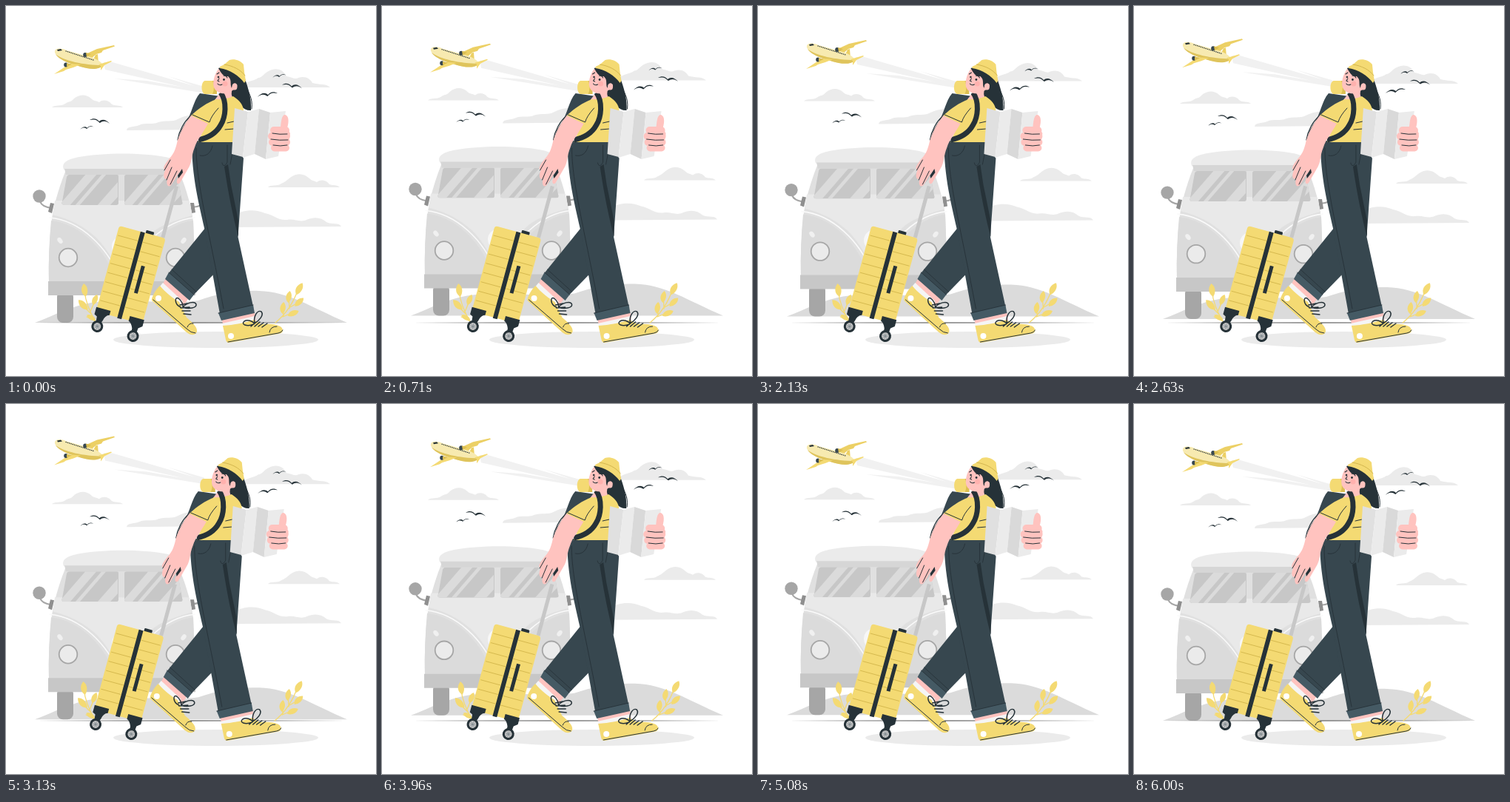
Animation of 500x500 px, one loop 6040 ms. Source, as an HTML page:

```html
<!DOCTYPE html>
<html lang="en">
<head>
<meta charset="utf-8">
<title>Traveller</title>
<style>
html, body { margin: 0; width: 100%; height: 100%; overflow: hidden; background: #fff; }
svg { display: block; width: 100vw; height: 100vh; }
.line { fill: none; stroke: #263238; stroke-linecap: round; stroke-linejoin: round; }
.skin { fill: #ffc3bf; }
.yellow { fill: #f4da73; }
.dark { fill: #263238; }
.slate { fill: #37474f; }
.cloud { fill: #ebebeb; }
</style>
</head>
<body>
<svg viewBox="0 0 500 500">
<defs>
  <path id="bird" class="dark" d="M-14-1C-9-4-4-3-1 1C3-3 9-1 13 4C8 0 4 0 0 3C-1 3-1 2-2 1.500C-5-2-8-2-14-1Z"/>
  <path id="leaf" class="yellow" d="M0 9C-6 4-5-4 1-9C6-4 5 4 0 9Z"/>
  <g id="wheel">
    <circle r="8" class="dark"/><circle r="4.9" fill="#c7c7c7"/>
    <path d="M-4 0H4M0-4V4M-3-3L3 3M3-3L-3 3" stroke="#7d878c" stroke-width=".7"/>
  </g>
  <clipPath id="panes">
    <path d="M86 228H150Q152 228 152 230V266Q152 269 149 269H79Q74 269 76 264L82 231Q83 228 86 228Z"/>
    <path d="M163 228H228Q231 228 232 231L238 264Q240 269 235 269H163Q160 269 160 266V231Q160 228 163 228Z"/>
  </clipPath>
</defs>

<g id="scenery">
  <g class="cloud">
    <path d="M62 137C67 133 74 136 80 132C86 128 87 131 92 125C99 119 109 119 115 125C119 129 123 128 126 130C130 126 139 127 142 132C147 136 153 133 158 137Z"/>
    <path d="M163 168C164 162 172 164 180 161C188 157 198 161 206 157C215 154 225 157 232 153C243 147 257 145 266 152V167Z"/>
    <path d="M318 110C323 101 334 102 341 97C346 97 348 91 355 88C364 83 374 85 379 95C386 96 391 100 395 97C404 94 411 98 414 104C423 107 432 104 438 110Z"/>
    <path d="M354 245C357 241 367 244 372 240C380 237 381 233 387 230C395 225 404 227 410 233C414 237 417 236 420 238C426 233 434 236 437 241C442 243 447 241 451 245Z"/>
    <path d="M306 299V284C319 275 337 274 350 280C362 282 367 290 380 289C390 287 397 293 406 289C417 284 427 286 433 292C441 296 450 292 453 298Z"/>
  </g>
  <path fill="#dbdbdb" d="M39 428C65 418 90 405 115 401C160 394 220 404 260 398C285 389 315 384 342 385C382 386 412 407 461 428Z"/>

  <path fill="none" stroke="#a6a6a6" stroke-width="2.2" d="M46 264C48 270 54 272 61 273M251 272Q258 272 264 269"/>
  <circle cx="45" cy="257" r="8.7" fill="#a6a6a6"/>
  <path fill="#8f8f8f" d="M60 266L65 267L62 280L57 278ZM249 266L254 266L256 279L251 280Z"/>
  <rect x="69" y="385" width="22" height="43" rx="8" fill="#a6a6a6"/>
  <path fill="#e0e0e0" d="M82 219H231C240 236 249 263 253 291L256 374H58C57 344 59 315 62 287C66 262 74 239 82 219Z"/>
  <path fill="#e9e9e9" d="M63 282C85 288 100 294 121 312C137 328 150 350 157 372C165 347 181 319 200 304C218 292 235 288 252 283L247 263H66Z"/>
  <path fill="#dbdbdb" d="M61 290C101 294 137 332 150 374H58Q57 330 61 290ZM253 290C216 294 180 332 166 374H256Z"/>
  <path class="line" style="stroke:#fafafa" stroke-width="1.6" d="M59 286C101 290 137 326 154 368M255 286C214 290 178 326 161 368"/>
  <path fill="#ebebeb" d="M78 221C74 211 84 207 99 204C132 198 184 198 215 204C230 207 238 212 235 222Z"/>
  <path fill="#d6d6d6" d="M79 220H235L233 228H81Z"/>
  <g clip-path="url(#panes)">
    <path fill="#c7c7c7" d="M70 225H245V272H70Z"/>
    <path fill="#dbdbdb" d="M109 226H124L85 271H70ZM131 226H137L98 271H92ZM151 238V258L139 271H122ZM194 226H208L169 271H155ZM215 226H221L182 271H176ZM240 232V252L222 271H205Z"/>
  </g>
  <circle cx="157" cy="325" r="14" fill="#f7f7f7"/>
  <g fill="#ebebeb" stroke="#a6a6a6" stroke-width="1.8">
    <circle cx="84" cy="340" r="12.3"/><circle cx="229" cy="340" r="12.3"/>
  </g>
  <g fill="#f0f0f0">
    <ellipse cx="73" cy="317" rx="3" ry="4.5" transform="rotate(-38 73 317)"/>
    <ellipse cx="240" cy="317" rx="3" ry="4.5" transform="rotate(38 240 317)"/>
  </g>
  <path fill="#c7c7c7" d="M57 372H256V391H57Z"/>

  <use href="#bird" x="127" y="155"/>
  <use href="#bird" transform="translate(109 164) scale(-.66 .66)"/>
  <use href="#bird" transform="translate(353 119) scale(-1 1)"/>
  <use href="#bird" x="387" y="107.500"/>
  <use href="#bird" transform="translate(369 94) scale(-.66 .66)"/>
</g>

<path fill="#7a7a7a" d="M40 428Q250 426.500 460 428Q250 429.500 40 428Z"/>
<ellipse cx="283.500" cy="451" rx="138.500" ry="11" fill="#ebebeb"/>

<g id="plants"></g>

<g id="plane">
  <path fill="#f1f1f1" d="M132 76L144 76L268 112V116L134 86ZM146 98L190 101L270 115V118ZM219 95L268 109V113Z"/>
  <path fill="#ecd065" d="M101 68L123 58L146 53L147 54.500L131 60L129 63L122 65L114 72ZM118 72L121 66L124 65L125 78Z"/>
  <path fill="#f7eab0" d="M66 63C65 57 73 56 82 60L118 70C125 73 130 77 131 80C129 84 119 86 109 84C92 80 70 72 66 63Z"/>
  <path fill="#dfc45c" d="M67 65C78 74 105 80 131 80C128 85 118 86 109 84C92 80 72 74 67 65Z"/>
  <path class="yellow" d="M86 78L74 86L65 92L78 88L81 86L91 83L101 79ZM125 79L142 74L143 75L133 80L128 87L128 81Z"/>
  <path class="dark" d="M69 59L74 58L76 60L70 61Z"/>
  <path class="line" stroke-width="1.3" stroke-dasharray=".4 2" d="M81 61L118 73"/>
  <ellipse cx="107" cy="66" rx="2.800" ry="3" class="slate"/><ellipse cx="81" cy="79.500" rx="2.800" ry="3" class="slate"/>
  <path fill="#dcbf52" d="M108 63L115 65L109 69ZM82 77L89 79L82 82Z"/>
</g>

<g id="walker">
  <g id="suitcase" transform="translate(153 297) rotate(15.200)">
    <path stroke="#c7c7c7" stroke-width="5" d="M61 0V-72"/>
    <rect x="37" y="-4" width="11" height="7" rx="1" class="dark"/>
    <rect width="65" height="120" rx="4" class="yellow"/>
    <path id="ribs" class="line" style="stroke:#d5b84e" stroke-width=".9"/>
    <path class="dark" d="M30 0H36V121H30ZM43 44H48V82H43Z"/>
    <path class="dark" d="M-1 114H19V120Q13 122 12 130L8 139L4 136L3 126L-1 124ZM46 114H66V123L61 127L60 137L54 139L53 129Q50 122 46 121Z"/>
    <use href="#wheel" x="7" y="139"/><use href="#wheel" x="57" y="139"/>
  </g>

  <path class="slate" d="M262 118L290 122L286 154L245 178L235 184C232 176 236 167 243 158C251 146 253 128 262 118Z"/>
  <path class="line" stroke-width="1.2" d="M249 149C241 156 234 168 232 181"/>
  <path class="yellow" d="M269 101H283V119H269C263 118 263 102 269 101Z"/>
  <path fill="#dcbf52" d="M279 101H285V119H279Q283 110 279 101Z"/>

  <path class="skin" d="M216 368L246 396L240 405L209 381Z"/>
  <path fill="#f5f5f5" d="M212 374L239 399L235 405L207 380Z"/>
  <path class="yellow" d="M208 378C215 387 226 395 234 400L244 421C252 428 259 434 258 440C256 446 249 445 244 441L197 398C196 395 202 383 208 378Z"/>
  <circle cx="206" cy="395" r="4" fill="#fff"/>
  <path class="line" stroke-width="1" d="M199 397L244 436Q250 442 256 442M245 434Q247 428 253 429"/>
  <path class="line" stroke-width="1.5" d="M235 404L245 402M236 408L248 407M238 412L249 412M240 416L250 417M236 407C227 403 228 392 233 395C237 398 240 404 239 407C244 401 255 398 257 403C258 408 247 410 239 407"/>
  <path class="slate" d="M270 299L219 362L251 393L286 357Z"/>
  <path fill="#455a64" d="M220 360L254 390L248 398L215 369Z"/>
  <path class="line" stroke-width=".8" d="M220 360L254 390M224 356L257 386"/>

  <path class="skin" d="M291 420L335 411L338 426L294 434Z"/>
  <path fill="#f5f5f5" d="M292 429L336 419L337 425L294 434Z"/>
  <path class="yellow" d="M293 432C308 431 324 428 335 424L345 430C355 429 368 430 372 434C376 439 374 442 368 443L301 455Q298 455 297 451Z"/>
  <circle cx="304" cy="446" r="4" fill="#fff"/>
  <path class="line" stroke-width="1" d="M300 454L368 442Q373 441 374 438M356 441Q357 433 366 433"/>
  <path class="line" stroke-width="1.500" d="M331 433L338 427M336 433L343 427M341 433L348 428M346 434L353 429M335 430C325 434 317 430 322 426C327 423 333 426 336 429C334 419 340 410 345 413C349 418 342 425 336 429"/>
  <path class="slate" d="M251 182H309L321 206L313.500 312L334 406L289 416L268 300C261 268 251 232 251 182Z"/>
  <path class="dark" d="M295 217L300 214L304 241L314 290V312C307 285 301 257 295 217Z"/>
  <path fill="#455a64" d="M287 415L334 404L336 415L291 425Z"/>
  <path class="line" stroke-width=".9" d="M287 415L334 404M257 192C257 239 274 302 294 409M299 188V211C297 216 293 218 292 212M279 189C277 199 270 204 262 202M303 214L308 188"/>

  <path class="skin" d="M292 114L308 114L314 129L294 132L282 127Z"/>
  <path class="dark" d="M303 89L322 96C327 110 332 124 331 141C321 142 315 132 307 125Q303 119 306 112Z"/>
  <path class="line" stroke-width="1" d="M322 104C327 117 334 123 332 139"/>
  <path class="yellow" d="M284 126C292 127 300 125 307 122C315 127 320 133 321 140L309 184H260L269 161L250 148C261 138 271 131 284 126Z"/>
  <path class="line" stroke-width="1" d="M252 147L275 157Q277 149 287 138M299 158L308 156M296 167L308 166"/>
  <path class="line" stroke-width="7" style="stroke-linecap:butt" d="M290 117C299 129 297 150 290 161C284 172 274 178 260 181"/>

  <path class="skin" d="M250 148L273 159C266 172 258 181 255 191C250 203 252 211 246 220L235 239C232 242 229 239 232 233L235 224L230 231L223 242C219 246 216 241 218 234C213 235 212 229 215 222C211 219 214 215 220 207C228 199 230 190 232 181Q238 163 250 148Z"/>
  <path class="line" stroke-width="1" d="M217 235L224 218M214 222L222 208M222 241L231 223"/>
  <path class="dark" d="M232 229L238 220L239 225L233 233Z"/>

  <g>
    <path fill="#e0e0e0" d="M309 138L327 143L320 204L305 200Z"/>
    <path fill="#ebebeb" d="M327 143L342 139L336 200L320 205Z"/>
    <path fill="#d9d9d9" d="M342 139L357 144L351 207L336 200Z"/>
    <path fill="#ebebeb" d="M357 144L378 142L368 203L351 207Z"/>
  </g>
  <path class="skin" d="M370 170C372 161 371 150 376 147C382 147 383 155 380 165L384 172L381 192L363 194Z"/>
  <g class="skin">
    <rect x="357" y="163" width="26" height="10" rx="5"/><rect x="354" y="171" width="30" height="10" rx="5"/>
    <rect x="355" y="179" width="29" height="10" rx="5"/><rect x="358" y="187" width="25" height="9.500" rx="4.700"/>
  </g>
  <path class="line" stroke-width="1" d="M360 172Q370 174 380 173M358 180Q370 182 381 181M361 188Q371 190 380 188"/>

  <path class="skin" d="M288 84C281 92 278 106 282 112C287 119 299 121 306 114C313 112 314 105 310 104L309 95Z"/>
  <path class="dark" d="M287 84C296 82 309 88 315 96L312 106C308 102 306 107 305 111C302 105 306 100 300 95C294 96 291 91 287 84Z"/>
  <ellipse cx="309" cy="109" rx="3.500" ry="4.500" class="skin"/>
  <circle cx="296" cy="105" r="3.500" fill="#ff9c98" opacity=".45"/>
  <circle cx="287" cy="96" r="1.300" class="dark"/><circle cx="294.500" cy="99.500" r="1.400" class="dark"/>
  <path class="line" stroke-width="1.100" d="M285 92L288 90M294 94Q298 94 299 97M288 98L286 101L288 102M286 105Q288 108 292 106"/>
  <path class="yellow" d="M289 82L295 79L302 73C309 71 317 74 321 79L322 89L324 101L322 104C315 94 302 86 289 84Z"/>
  <path class="line" style="stroke:#cfb24b" stroke-width=".9" d="M295 79C307 81 317 86 323 94"/>
</g>
</svg>

<script>
const LOOP = 6040, LONG = 6000, SHORT = 1500;
const SHAKE = [0, -1, 2, -4, 4, -4, 4, -4, 2, -1, 0];
const byId = id => document.getElementById(id);
const move = (id, x, y) => byId(id).setAttribute('transform', `translate(${x} ${y})`);

const leaf = (x, y, angle, size = 1) =>
  `<use href="#leaf" transform="translate(${x} ${y}) rotate(${angle}) scale(${size})"/>`;
const stem = d => `<path class="line" style="stroke:#f4da73" stroke-width="1.300" d="${d}"/>`;

byId('plants').innerHTML =
  stem('M122 428C112 412 107 396 106 384M116 417L100 401M114 413L122 394M121 426L109 420') +
  leaf(106, 384, -12) + leaf(104, 404, -48) + leaf(120, 397, 18, .85) + leaf(115, 421, -65, .75) +
  stem('M364 428C381 414 390 397 395 382M375 419L374 404M383 409L382 391M374 420L391 413M384 407L398 399') +
  leaf(396, 382, 24) + leaf(382, 393, 5, .9) + leaf(374, 408, 2, .9) +
  leaf(396, 400, 42, .9) + leaf(388, 415, 62, .9);

byId('ribs').setAttribute('d',
  Array.from({ length: 8 }, (_, i) => `M2 ${13 + i * 13}H29M37 ${13 + i * 13}H63`).join(''));

// Linear rise of 10 px and back
const float = (t, period) => -10 * (1 - Math.abs(1 - 2 * (t % period) / period));

function shake(t, period) {
  const step = (t % period) / period * 10, i = Math.floor(step);
  return SHAKE[i] + (SHAKE[i + 1] - SHAKE[i]) * (step - i);
}

const start = performance.now();
function draw(now) {
  // The loop rests briefly in its first pose before it repeats
  const t = Math.min(Math.max(0, now - start) % LOOP, LONG);
  move('scenery', 0, float(t, SHORT));
  move('plane', 0, float(t, LONG));
  move('plants', shake(t, SHORT), 0);
  move('walker', shake(t, LONG), 0);
  requestAnimationFrame(draw);
}
draw(start);
</script>
</body>
</html>
```
